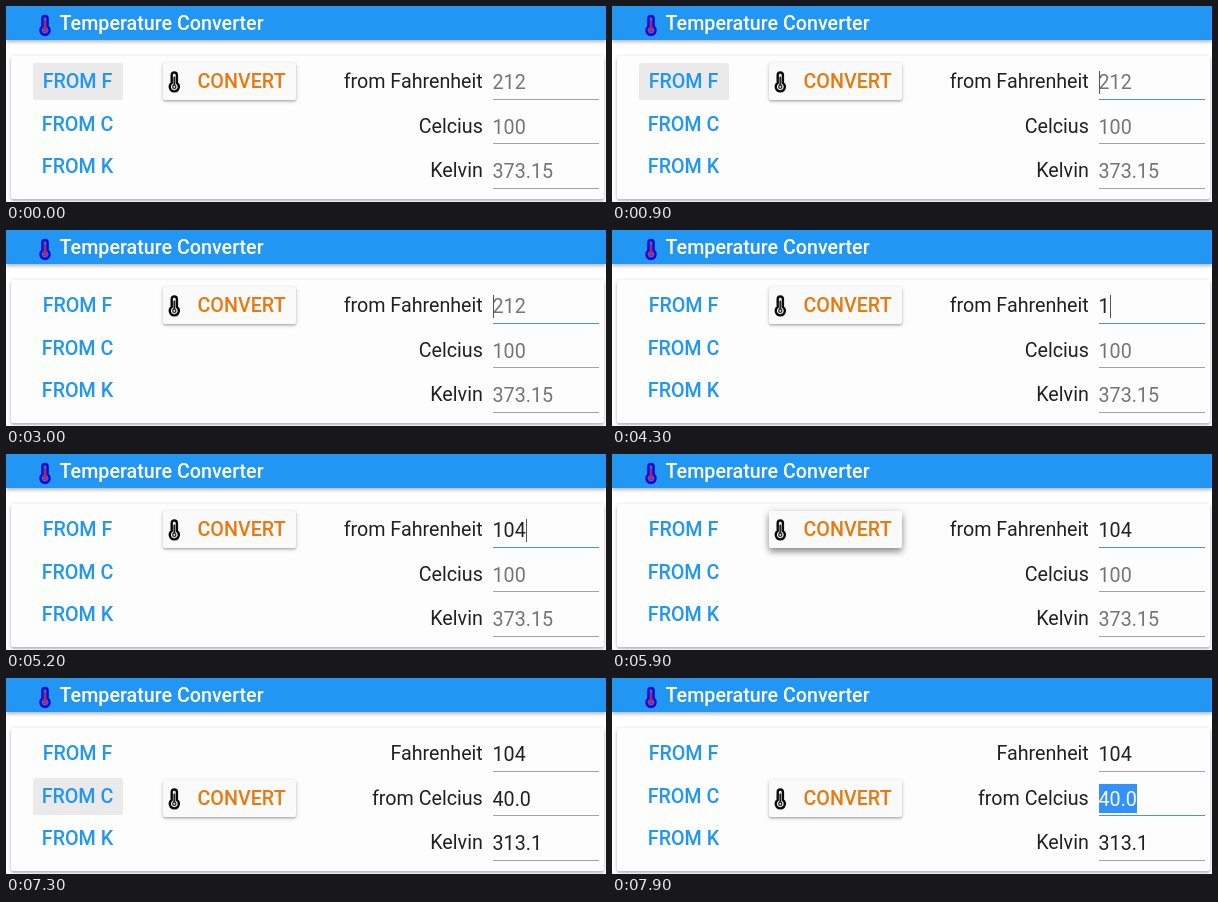
Animation of 600 by 196 pixels, one loop 8 s. Source, as an HTML page:

```html
<!DOCTYPE html>
<html lang="en">
<head>
<meta charset="utf-8">
<title>Temperature Converter</title>
<style>
  html, body { margin: 0; width: 100%; height: 100%; overflow: hidden; background: #fff; }
  div, svg { position: absolute; }
  svg { left: 0; top: 0; font: 19.7px Roboto, sans-serif; }
  .bar { left: 0; top: 0; width: 600px; height: 34px; background: #2196f3;
    box-shadow: 0 2px 3px rgba(0,0,0,.2), 0 1px 6px rgba(0,0,0,.14); }
  .card { left: 5px; top: 50px; width: 593px; height: 143px; background: #fefdfe; border-radius: 2px;
    box-shadow: 0 2px 2px rgba(0,0,0,.16), 0 1px 4px rgba(0,0,0,.2); }
  .held { left: 26.5px; width: 90px; height: 37px; background: #ebeaeb; border-radius: 2px; }
  .convert { left: 157px; top: 57px; width: 133px; height: 37px; background: #fafafa; border-radius: 2px; }
  .medium { font-weight: 500; }
  .choice { fill: #2196f3; text-anchor: middle; }
  .label { fill: #212121; text-anchor: end; }
</style>
</head>
<body>
<div class="bar"></div>
<div class="card"></div>
<div class="held" id="heldF" style="top:57px"></div>
<div class="held" id="heldC" style="top:99.5px"></div>
<div class="convert" id="convert"></div>
<svg width="600" height="196" viewBox="0 0 600 196">
  <defs>
    <g id="thermometer" stroke-width="2.4" stroke-linecap="round">
      <path d="M-2.6 11.5V3.6a2.6 2.6 0 0 1 5.2 0V11.5a4.6 4.6 0 1 1-5.2 0Z" stroke="currentColor"/>
      <path d="M0 6V15" stroke-width="1.8"/>
      <circle cy="15.3" r="1.6" stroke-width="1.2"/>
    </g>
  </defs>
  <use href="#thermometer" x="39" y="9" color="#0808d8" fill="#4a60d0" stroke="#c01848"/>
  <text class="medium" x="53.5" y="24" fill="#fff">Temperature Converter</text>
  <g class="medium choice">
    <text x="71.5" y="82">FROM F</text>
    <text x="71.5" y="125">FROM C</text>
    <text x="71.5" y="167">FROM K</text>
  </g>
  <g id="convertFace">
    <use href="#thermometer" x="168.3" y="65.5" color="#080808" fill="#eee" stroke="#222"/>
    <text class="medium" x="191.5" y="82" fill="#ea780c">CONVERT</text>
  </g>
  <g id="fields"></g>
  <rect id="caret" y="65" width="1" height="23" fill="#555"/>
</svg>
<script>
const LOOP = 8000, FIELD_X = 487, FIELD_WIDTH = 106;
const DARK = '#212121', HINT = '#757575';
const byId = id => document.getElementById(id);
const ramp = (t, from, to) => Math.min(1, Math.max(0, (t - from) / (to - from)));
const ease = p => p * p * (3 - 2 * p);
const within = (t, from, to) => t >= from && t < to;

function add(parent, tag, attrs) {
  const el = document.createElementNS('http://www.w3.org/2000/svg', tag);
  for (const key in attrs) el.setAttribute(key, attrs[key]);
  return parent.appendChild(el);
}

const fields = [0, 1, 2].map(row => {
  const g = byId('fields'), rowY = 93 + 44.5 * row;
  const lineY = Math.floor(rowY), base = Math.round(rowY - 10.8);
  add(g, 'rect', { x: FIELD_X, y: lineY, width: FIELD_WIDTH, height: 1, fill: '#a2a2a2' });
  return {
    selection: add(g, 'rect', { x: FIELD_X, y: lineY - 31, width: 38, height: 29, fill: '#3390ff' }),
    focus: add(g, 'rect', { y: lineY, height: 1, fill: '#4a94d6' }),
    label: add(g, 'text', { class: 'label', x: 476.8, y: base }),
    value: add(g, 'text', { x: 486.5, y: base + 1 })
  };
});

function setField(field, label, value, color, focus, selected) {
  field.label.textContent = label;
  field.value.textContent = value;
  field.value.setAttribute('fill', color);
  field.selection.setAttribute('opacity', selected ? 1 : 0);
  field.focus.setAttribute('x', FIELD_X + FIELD_WIDTH * (1 - focus) / 2);
  field.focus.setAttribute('width', FIELD_WIDTH * focus);
}

function render(t) {
  const typed = t < 4000 ? '' : t < 4400 ? '1' : t < 4800 ? '10' : '104';
  const converted = t >= 6000, fromC = t >= 7200, selected = t >= 7700;
  const resultColor = converted ? DARK : HINT;
  const focusF = t < 6000 ? ease(ramp(t, 650, 900)) : 0;
  const focusC = ease(ramp(t, 7600, 7900));

  setField(fields[0], fromC ? 'Fahrenheit' : 'from Fahrenheit', typed || '212', typed ? DARK : HINT, focusF);
  setField(fields[1], fromC ? 'from Celcius' : 'Celcius', converted ? '40.0' : '100',
    selected ? '#fff' : resultColor, focusC, selected);
  setField(fields[2], 'Kelvin', converted ? '313.1' : '373.15', resultColor, 0);

  const caretOn = within(t, 800, 1400) || within(t, 1900, 2300) || within(t, 2800, 5300);
  byId('caret').setAttribute('opacity', caretOn ? 1 : 0);
  byId('caret').setAttribute('x', FIELD_X + typed.length * 11);

  byId('heldF').style.opacity = 1 - ramp(t, 950, 1100);
  byId('heldC').style.opacity = t < 7000 ? 0 : 1 - ramp(t, 7650, 7800);

  const lift = ramp(t, 5750, 5890) - ramp(t, 5950, 6100);
  const drop = fromC ? 45 : 0;
  byId('convert').style.boxShadow =
    `0 ${1.5 + 2.5 * lift}px ${2 + 4 * lift}px rgba(0,0,0,${.22 + .14 * lift}), ` +
    `0 1px ${4 + 6 * lift}px rgba(0,0,0,.16)`;
  byId('convert').style.transform = `translateY(${drop}px)`;
  byId('convertFace').setAttribute('transform', `translate(0 ${drop})`);
}

const start = performance.now();
function frame() {
  render((performance.now() - start) % LOOP);
  requestAnimationFrame(frame);
}
frame();
</script>
</body>
</html>
```
